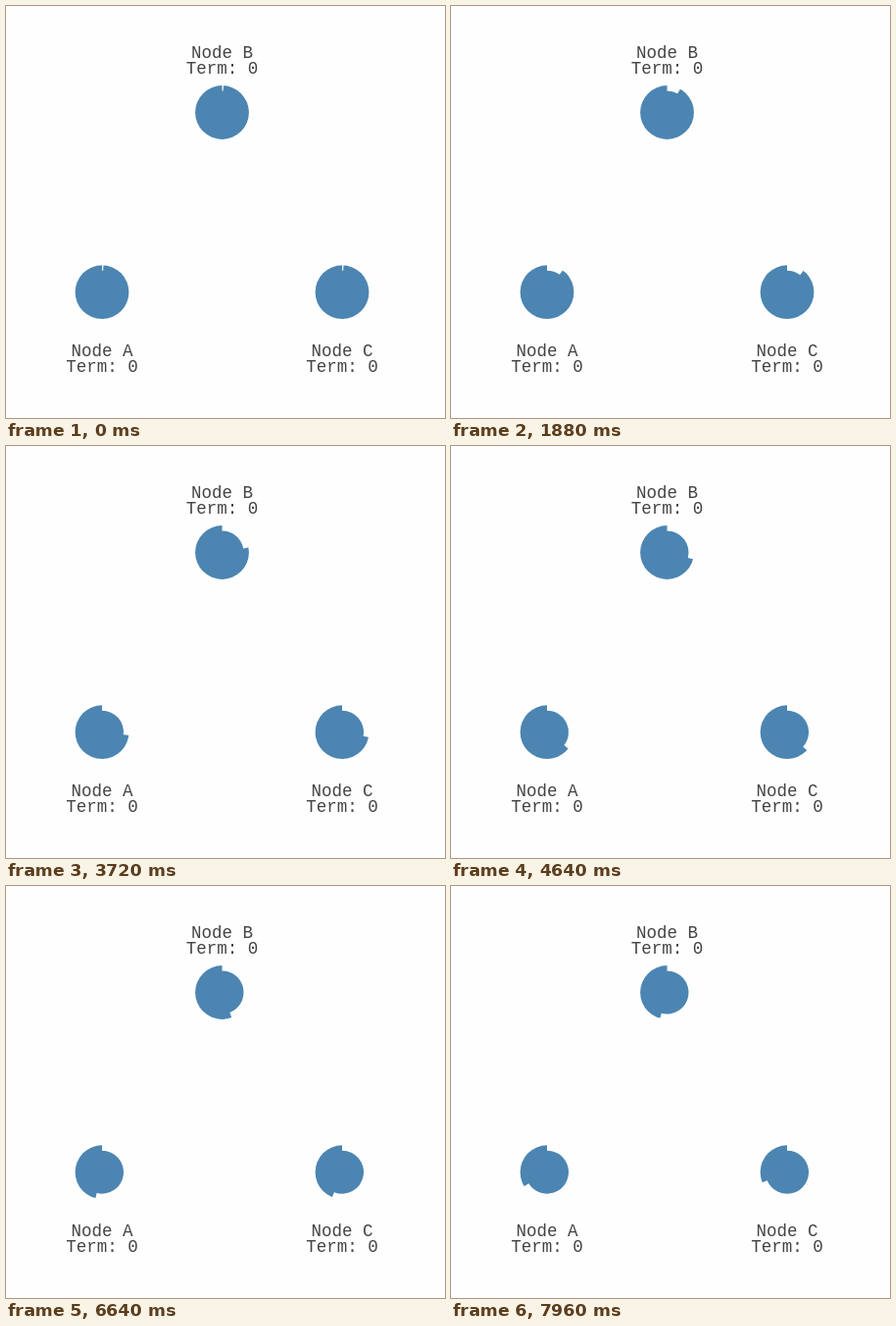
Write an HTML page that moves like this. It is 448 px wide and 420 px high and loops after 8000 ms.

```html
<!DOCTYPE html>
<html lang="en">
<head>
<meta charset="utf-8">
<title>Election timers</title>
<style>
  html, body { margin: 0; width: 100%; height: 100%; overflow: hidden; background: #fefefe; }
  svg { display: block; width: 448px; height: 420px; }
  text { font: 17.5px "Liberation Mono", monospace; text-anchor: middle; fill: #444; }
</style>
</head>
<body>
<svg id="stage" viewBox="0 0 448 420"></svg>
<script>
const LOOP = 8000, STEP = 40, START = 810;
const OUTER = 27.4, INNER = 22;
const BLUE = '#4c85b1', PAPER = '#fefefe';

// rate: degrees of the ring used up per millisecond
const nodes = [
  { name: 'A', x: 98, y: 291.7, labelY: 356.5, rate: 0.0333 },
  { name: 'B', x: 220.5, y: 108.5, labelY: 52.5, rate: 0.0273 },
  { name: 'C', x: 343, y: 291.7, labelY: 356.5, rate: 0.0346 }
];

const stage = document.getElementById('stage');

function add(tag, attributes, content = '') {
  const element = document.createElementNS('http://www.w3.org/2000/svg', tag);
  for (const key in attributes) element.setAttribute(key, attributes[key]);
  element.textContent = content;
  return stage.appendChild(element);
}

for (const node of nodes) {
  const { x, y, labelY } = node;
  add('circle', { cx: x, cy: y, r: OUTER, fill: BLUE });
  node.gap = add('path', { fill: PAPER, transform: `translate(${x} ${y})` });
  add('text', { x, y: labelY }, `Node ${node.name}`);
  add('text', { x, y: labelY + 16 }, 'Term: 0');
}

// Ring segment running clockwise from twelve o'clock
function ringSegment(degrees) {
  const angle = degrees * Math.PI / 180;
  const sin = Math.sin(angle), cos = -Math.cos(angle);
  const large = degrees > 180 ? 1 : 0;
  const r = OUTER + 0.8;
  return `M0 ${-r}A${r} ${r} 0 ${large} 1 ${r * sin} ${r * cos}` +
    `L${INNER * sin} ${INNER * cos}A${INNER} ${INNER} 0 ${large} 0 0 ${-INNER}Z`;
}

function draw() {
  const time = Math.floor(performance.now() % LOOP / STEP) * STEP;
  for (const { gap, rate } of nodes) {
    gap.setAttribute('d', ringSegment(Math.max(3, (time - START) * rate)));
  }
  requestAnimationFrame(draw);
}
draw();
</script>
</body>
</html>
```
